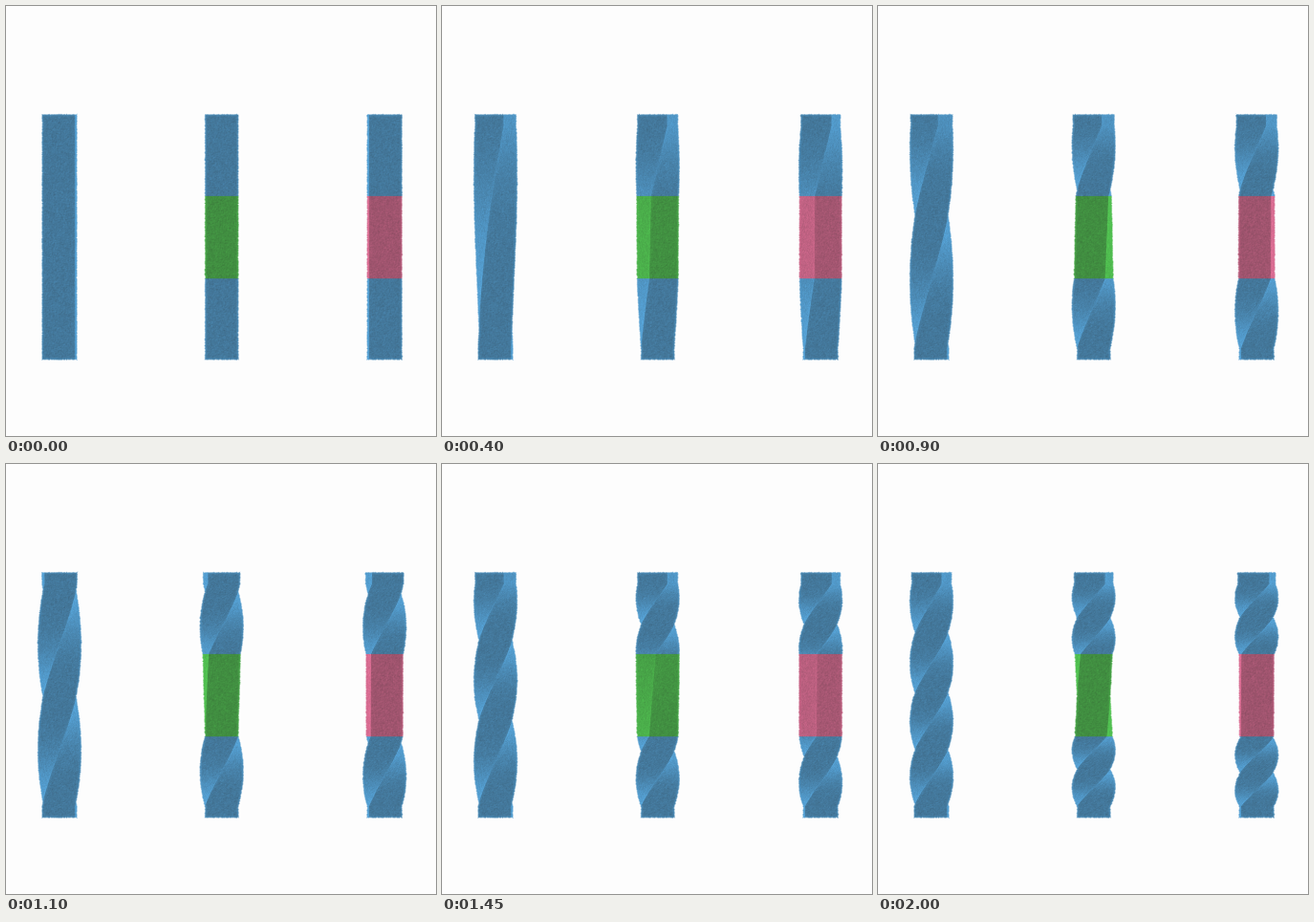
Recreate the animation shown at these times as a matplotlib script. Size 450 px wide and 450 px high, loop 2.05 s.

```python
import numpy as np
import matplotlib.pyplot as plt
from matplotlib.animation import FuncAnimation

SIZE, FRAMES, INTERVAL = 450, 41, 50
HALF, ROUND = 17.5, 4.5          # half side and corner radius of the section
TOP, JOIN_A, JOIN_B, BOTTOM = 113.4, 198.9, 285.2, 370.2
CLAMP = 12                       # rigid length at both ends
TURN = 8.6                       # degrees per step at the driven end
SKEW = 3.7                       # perspective yaw of the outer bars
PAPER = np.array([253, 253, 253.0])
BLUE = np.array([84, 158, 208.0])
GREEN = np.array([80, 190, 80.0])
PINK = np.array([215, 108, 145.0])
HAZE = 30                        # grey added to the darker faces

# centre x, yaw, colour of the core, core twist at the end
BARS = [
    (56.0, -SKEW, BLUE, None),
    (225.7, 0.0, GREEN, 11.0),
    (396.2, SKEW, PINK, 1.0),
]

rng = np.random.default_rng(7)


def soft_noise(shape):
    n = rng.normal(size=shape)
    n = n + 0.45 * (np.roll(n, 1, -1) + np.roll(n, 1, -2))
    return n / n.std()


GRAIN = soft_noise((3, 4, SIZE, 40))
FUZZ = soft_noise((3, 2, SIZE)) * 0.16
Y = np.arange(SIZE) + 0.5
X = np.arange(SIZE)[None, :] + 0.5
ROWS = np.arange(SIZE)[:, None]


def twist(i, core):
    """Rotation in degrees of every row."""
    top = TURN * i
    start, end = TOP + CLAMP, BOTTOM - CLAMP
    lag = np.interp(i, [0, 8, 14, 22, 29, 34, 40], [0, -8, 2, 1, -3, -5, 8])
    if core is None:
        v = np.clip((end - Y) / (end - start), 0, 1)
        return top * v + 4 * v * (1 - v) * lag
    mid, half = top / 2 + lag, core * i / (FRAMES - 1)
    return np.interp(Y, [start, JOIN_A, JOIN_B, end],
                     [top, mid + half, mid - half, 0])


def draw_bar(img, n, i):
    cx, yaw, core_color, core = BARS[n]
    ang = twist(i, core) + yaw
    quarter = np.floor(ang / 90).astype(int)[:, None]
    a = np.radians(ang % 90)[:, None]
    sin, cos = np.sin(a), np.cos(a)
    half = (HALF - ROUND) * (sin + cos) + ROUND
    left, right = cx - half, cx + half
    edge = cx + HALF * (sin - cos)

    # oblique faces and the ridge between them are lighter
    w = np.clip(X - edge + 0.5, 0, 1)
    shade = 0.70 + 0.32 * ((1 - w) * cos**4 + w * sin**4)
    shade = shade + 0.06 * np.exp(-np.abs(X - edge))

    on_right = X > edge
    u = np.where(on_right, (X - edge) / np.maximum(cos, 0.03),
                 (X - left) / np.maximum(sin, 0.03))
    u = np.clip(u, 0, 39).astype(int)
    face = (quarter + 1 - on_right) % 4
    shade = shade + 0.026 * GRAIN[n, face, ROWS, u]

    inset = np.minimum(X - left + FUZZ[n, 0][:, None],
                       right - X + FUZZ[n, 1][:, None])
    ends = np.minimum(Y - TOP, BOTTOM - Y)[:, None] + FUZZ[n, 0][None, :]
    depth = np.minimum(inset, ends)
    shade = shade + (1 - shade) * 0.6 * np.clip(1 - depth / 2.5, 0, 1)
    alpha = np.clip(depth / 1.5 + 0.5, 0, 1)[..., None]

    k = np.clip(np.minimum(Y - JOIN_A, JOIN_B - Y) + 0.5, 0, 1)[:, None, None]
    shade = shade[..., None]
    color = (BLUE * (1 - k) + core_color * k) * shade + HAZE * (1 - shade)
    img[:] = img * (1 - alpha) + color * alpha


def render(i):
    img = np.tile(PAPER, (SIZE, SIZE, 1))
    for n in range(len(BARS)):
        draw_bar(img, n, i)
    return np.clip(img, 0, 255).astype(np.uint8)


fig = plt.figure(figsize=(4.5, 4.5), dpi=100)
ax = fig.add_axes([0, 0, 1, 1])
ax.axis("off")
picture = ax.imshow(render(0), interpolation="nearest", aspect="auto")


def update(i):
    picture.set_data(render(i))
    return [picture]


anim = FuncAnimation(fig, update, frames=FRAMES, interval=INTERVAL,
                     repeat=True, repeat_delay=0)
plt.show()
```
